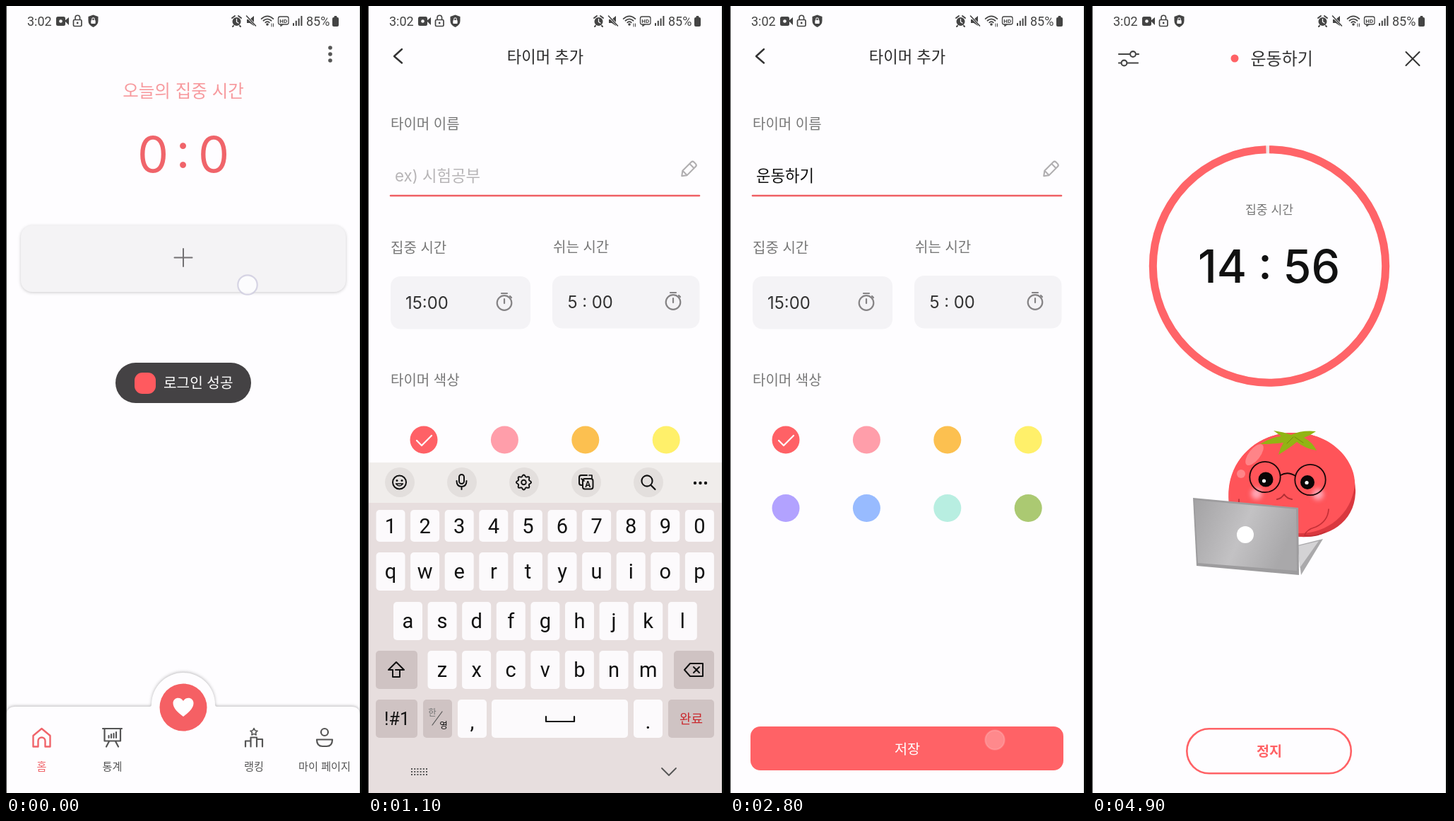
Animation of 504 by 1112 pixels, one loop 5000 ms. Source, as an HTML page:

```html
<!DOCTYPE html>
<html lang="ko">
<head>
<meta charset="utf-8">
<title>Focus timer</title>
<style>
html, body { margin: 0; width: 100%; height: 100%; overflow: hidden; background: #fefdff; }
svg { display: block; width: 504px; height: 1112px; }
text { font-family: 'Noto Sans CJK KR', 'Noto Sans KR', sans-serif; white-space: pre; }
.n { font-family: Inter, 'Noto Sans CJK KR', sans-serif; }
.r { font-family: Roboto, 'Noto Sans CJK KR', sans-serif; }
.m { text-anchor: middle; }
.e { text-anchor: end; }
.soft { filter: drop-shadow(0 1px 2px #0003); }
.up { filter: drop-shadow(0 -1px 2px #0004); }
.blur { filter: blur(3px); }
</style>
</head>
<body>
<svg id="stage" viewBox="0 0 504 1112"></svg>
<script>
const RED = '#ff6266', INK = '#444', GREY = '#777', BG = '#fefdff';
const LOOP = 5000, STEP = 100;

const rect = (x, y, w, h, r, fill, more = '') =>
  `<rect x="${x}" y="${y}" width="${w}" height="${h}" rx="${r}" fill="${fill}" ${more}/>`;
const dot = (x, y, r, fill, more = '') =>
  `<circle cx="${x}" cy="${y}" r="${r}" fill="${fill}" ${more}/>`;
const ring = (x, y, r, color, w) => dot(x, y, r, 'none', `stroke="${color}" stroke-width="${w}"`);
const line = (d, color, w, fill = 'none', more = '') =>
  `<path d="${d}" stroke="${color}" stroke-width="${w}" fill="${fill}" stroke-linecap="round" stroke-linejoin="round" ${more}/>`;
const fill = (d, color, more = '') => `<path d="${d}" fill="${color}" ${more}/>`;
const text = (x, y, size, str, color, cls = '', more = '') =>
  `<text x="${x}" y="${y}" font-size="${size}" fill="${color}" class="${cls}" ${more}>${str}</text>`;
const group = (id, body, more = '') => `<g id="${id}" ${more}>${body}</g>`;
const medium = 'font-weight="500"', bold = 'font-weight="700"';

function statusBar() {
  const bars = [0, 1, 2, 3].map(i => rect(406 + i * 3.8, 24 - i * 3.3, 2, 4 + i * 3.3, 0.5, INK)).join('');
  const waves = [3.5, 7, 10.5].map(r =>
    line(`M${370 - r * .8} ${26 - r * .75}Q370 ${26 - r * 1.45} ${370 + r * .8} ${26 - r * .75}`, INK, 1.7)).join('');
  return text(30, 27.5, 18, '3:02', INK, 'r')
    + rect(71, 15, 13, 13, 2.5, INK) + fill('M83 21l6-5v11z', INK) + dot(77.5, 21.5, 2.3, BG)
    + rect(95.5, 19.5, 11.5, 9, 1.5, 'none', `stroke="${INK}" stroke-width="1.7"`)
    + line('M98 19v-2.500a3.300 3.300 0 0 1 6.600 0v2.500', INK, 1.6) + dot(101.2, 24, 1.4, INK)
    + fill('M123.500 12.500l7 2.500v6q0 6-7 9q-7-3-7-9v-6z', INK)
    + rect(120.3, 20, 6.4, 5, 1, BG) + line('M121.800 20v-1.500a1.700 1.700 0 0 1 3.400 0v1.500', BG, 1.1)
    + dot(326.5, 22, 6, INK) + line('M320 17l4-3M333 17l-4-3M322 28l-1 1M331 28l1 1', INK, 2)
    + line('M326.500 18.500v4l2.500 1.500', BG, 1.3)
    + fill('M341 19h4l6-5v14l-6-4h-4z', INK) + line('M340 14l14 14', BG, 3) + line('M340.500 14l13 14', INK, 1.6)
    + waves + dot(370, 26, 1.8, INK) + line('M376 25v4m2.500-4v4', INK, 1)
    + rect(385.500, 15, 14.500, 11, 2.5, 'none', `stroke="${INK}" stroke-width="1.3"`)
    + text(392.8, 23.5, 8, 'HD', INK, 'r m', bold) + line('M389 26v2.500l3-2.500', INK, 1.2)
    + bars + text(425, 27.5, 18, '85%', INK, 'r')
    + rect(462, 16, 9, 13, 2, INK) + rect(464.5, 14, 4, 3, 1, INK);
}

function homePage() {
  const plus = rect(21, 310, 460, 94, 16, '#f4f3f5', 'class="soft"')
    + line('M238.500 355.500h25M251 343v25', '#737173', 2);
  const card = rect(21, 310, 460, 94, 16, '#fff', 'class="soft"') + dot(54, 357, 8, RED)
    + text(78, 365, 22, '운동하기', '#333') + text(450, 365, 22, '15 : 00', GREY, 'n e');
  const nav = fill('M1 1112V1002Q1 990 13 990H203Q206 990 206 987A45 45 0 0 1 296 987Q296 990 299 990H489Q501 990 501 1002V1112z', BG, 'class="up"')
    + dot(251, 991, 33.5, '#f56064')
    + fill('M251 1004C243 998 236.500 992 236.500 985C236.500 977 247 975 251 982C255 975 265.500 977 265.500 985C265.500 992 259 998 251 1004z', '#fff');
  const home = line('M38.500 1031l12-10l12 10v15.500h-7v-8a5 5 0 0 0-10 0v8h-7z', '#f0646a', 2.4);
  const stats = line('M137 1021h27M139.500 1021v17.500h22.500v-17.500M146 1039l-4 7.500M155 1039l4 7.500', '#555', 2.2)
    + line('M145.500 1034v-3M149 1034v-5M152.500 1034v-6M156 1034v-8', '#555', 2.1);
  const rank = line('M339 1046.500v-8h7.500M346.500 1046.500v-13h8.500v13M355 1036h8v10.500', '#555', 2.2)
    + line('M351 1020.500l1.600 3.200 3.400.500-2.500 2.400.600 3.400-3.100-1.600-3.100 1.600.600-3.400-2.500-2.400 3.400-.500z', '#555', 1.6);
  const me = ring(451, 1026, 5, '#555', 2.2) + line('M440 1036.500h22q0 9.500-8 9.500h-6q-8 0-8-9.500z', '#555', 2.2);
  const labels = [[50.500, '홈', '#f0646a'], [150.500, '통계', '#555'], [351, '랭킹', '#555'], [451, '마이 페이지', '#555']]
    .map(([x, s, c]) => text(x, 1080, 15.2, s, c, 'm', medium)).join('');
  return rect(1, 0, 500, 1112, 0, BG)
    + [59, 68, 77].map(y => dot(459, y, 2.8, '#555')).join('')
    + text(251, 129, 24.5, '오늘의 집중 시간', '#f79a9e', 'm')
    + text(208, 235, 70, '0', '#f0646a', 'n m') + text(294, 235, 70, '0', '#f0646a', 'n m')
    + text(250.500, 229, 68, ':', '#f0646a', 'n m')
    + group('card', card) + group('plus', plus) + nav + home + stats + rank + me + labels;
}

function stopwatch(x, y) {
  return ring(x, y + 1.5, 10.3, '#858385', 2.2)
    + line(`M${x - 4} ${y - 12}h8M${x} ${y - 4}v6M${x + 8} ${y - 8}l2 2`, '#858385', 2.2);
}

function addPage() {
  const colors = ['#ff6166', '#ff9eaa', '#fcc050', '#fff06a', '#b2a2ff', '#98bbff', '#b8eee1', '#abc972'];
  const dots = colors.map((c, i) => dot(79 + (i % 4) * 114.4, i < 4 ? 613 : 709.5, 19.5, c)).join('');
  const pencil = line('M-13 0l6-4.500h17a3 3 0 0 1 3 3v3a3 3 0 0 1-3 3h-17zM-7-4.500v9M7-4.500v9', '#b0aeb0', 2.1, 'none',
    'transform="translate(453.500 231) rotate(-45)"');
  return rect(1, 0, 500, 1112, 0, BG)
    + line('M48 61l-11 10l11 9.500', '#333', 2.4)
    + text(251, 79.5, 22.2, '타이머 추가', '#2a2a2a', 'm')
    + text(32, 174, 20, '타이머 이름', GREY)
    + text(38, 248, 22.3, 'ex) 시험공부', '#b7b5b7', 'n', 'id="hint"')
    + text(37, 248, 22.3, '', '#111', '', 'id="name"')
    + pencil + line('M32 268.500H469', '#8a888a', 1.2)
    + line('', '#ef5f64', 2.6, 'none', 'id="focus"')
    + line('', '#111', 1.5, 'none', 'id="compose"')
    + line('', '#e0565c', 2.4, 'none', 'id="caret"')
    + text(32, 349, 20, '집중 시간', GREY) + text(262, 348, 20, '쉬는 시간', GREY)
    + rect(32, 382, 198, 74.5, 14, '#f4f3f6') + rect(261, 381, 208.5, 74.5, 14, '#f4f3f6')
    + text(53, 428, 23.8, '15:00', '#333', 'n') + text(282.5, 427, 23.8, '5 : 00', '#333', 'n')
    + stopwatch(193, 418) + stopwatch(432, 417)
    + text(32, 536, 20, '타이머 색상', GREY) + dots
    + line('M69 614l7 7l14-14', '#fff', 2.2)
    + rect(29, 1018, 443, 62, 14, RED) + text(251, 1057, 19.7, '저장', '#fff', 'm', medium);
}

const ROWS = [
  { y: 712, h: 45, x: 32, en: '1234567890', ko: '1234567890' },
  { y: 772, h: 54, x: 32, en: 'qwertyuiop', ko: 'ㅂㅈㄷㄱㅅㅛㅕㅑㅐㅔ' },
  { y: 842, h: 54, x: 56.5, en: 'asdfghjkl', ko: 'ㅁㄴㅇㄹㅎㅗㅓㅏㅣ' },
  { y: 911, h: 54, x: 105, en: 'zxcvbnm', ko: 'ㅋㅌㅊㅍㅠㅜㅡ' }
];
const PITCH = 48.6, KEY = '#fcfafc', DARK = '#cfc3c3';

function letters(lang) {
  const size = lang === 'ko' ? 25 : 29;
  return ROWS.map(r => [...r[lang]].map((c, i) =>
    text(r.x + i * PITCH, r.y + r.h / 2 + 10, c < 'ㄱ' ? 29 : size, c, '#111', 'r m')).join('')).join('')
    + text(91, 1003, 12.5, '한', lang === 'ko' ? '#111' : '#777', 'm')
    + text(107, 1021, 12.5, '영', lang === 'ko' ? '#777' : '#111', 'm');
}

function keyboard() {
  const gear = Array.from({ length: 48 }, (_, i) => {
    const a = i * Math.PI / 24, r = 9.3 + 1.3 * Math.cos(a * 8);
    return `${i ? 'L' : 'M'}${(220.5 + r * Math.cos(a)).toFixed(1)} ${(673 + r * Math.sin(a)).toFixed(1)}`;
  }).join('') + 'z';
  const keys = ROWS.map(r => [...r.en].map((_, i) =>
    rect(r.x + i * PITCH - 20.5, r.y, 41, r.h, 5, KEY)).join('')).join('');
  const specials = [[11, 911, 59, DARK], [433, 911, 57, DARK], [11, 980, 59, DARK], [78, 980, 41, DARK],
    [127, 980, 41, KEY], [175, 980, 193, KEY], [376, 980, 41, KEY], [425, 980, 65, DARK]]
    .map(([x, y, w, c]) => rect(x, y, w, 54, 5, c)).join('');
  const grid = Array.from({ length: 18 }, (_, i) =>
    rect(61 + (i % 6) * 4.2, 1077 + Math.floor(i / 6) * 4, 2, 2, 0, '#555')).join('');
  return rect(1, 645, 500, 467, 0, '#e7dede') + rect(1, 645, 500, 57, 0, '#f0edeb')
    + [45, 133, 221, 309, 397].map(x => dot(x, 673, 21, '#e3dfdd')).join('')
    + ring(44.5, 673, 9.5, '#111', 2) + dot(41, 670.5, 1.5, '#111') + dot(48, 670.5, 1.5, '#111')
    + line('M39.500 675q5 6 10 0z', '#111', 1.5)
    + rect(129, 662, 7, 13, 3.5, 'none', 'stroke="#111" stroke-width="2"')
    + line('M125.500 671q0 8 7 8t7-8M132.500 679v4', '#111', 2)
    + line(gear, '#111', 1.9) + ring(220.5, 673, 3.3, '#111', 1.9)
    + line('M303 677h-1a3 3 0 0 1-3-3v-8a3 3 0 0 1 3-3h8', '#111', 2)
    + rect(304, 668, 14.5, 14.5, 3, '#e3dfdd', 'stroke="#111" stroke-width="2"')
    + text(311.3, 680, 12, 'A', '#111', 'r m', bold) + line('M313 663h4v4M302 668l4 3', '#111', 1.7)
    + ring(395, 671, 7.6, '#111', 2.1) + line('M400.500 677l6 6', '#111', 2.2)
    + [463, 470.5, 478].map(x => dot(x, 674, 2.2, '#111')).join('')
    + keys + specials
    + line('M40 927l-11 11h6v10h10v-10h-6h12z', '#111', 2)
    + line('M448 938l8-9h18v18h-18zM461 934l8 8M469 934l-8 8', '#111', 2)
    + text(41, 1016, 25, '!#1', '#111', 'r m') + line('M91 1016l14-19', '#555', 1.2)
    + text(147.5, 1021, 30, ',', '#111', 'r m') + text(396.5, 1021, 30, '.', '#111', 'r m')
    + line('M252 1004v7h40v-7', '#111', 2.2) + text(457.5, 1014, 18, '완료', '#c9282d', 'm')
    + group('en', letters('en')) + group('ko', letters('ko'))
    + grid + line('M416 1077l10 10l10-10', '#555', 1.8)
    + group('popup', rect(-37.5, -106, 75, 96, 9, '#fdfcfd', 'class="soft"')
      + text(0, -41, 42, '', '#111', 'm', 'id="glyph"'));
}

function tomato() {
  const body = 'M194 705C188 645 232 602 287 603C345 604 375 650 373 688C371 733 330 752 294 750L215 745Q197 735 194 705z';
  return fill(body, '#d9383f')
    + fill('M194 700C188 645 232 602 287 603C345 604 374 648 372 676C368 720 330 746 294 745L215 745Q197 735 194 700z', '#ff5459')
    + '<ellipse cx="230" cy="634" rx="8" ry="18" fill="#ff8488" transform="rotate(38 230 634)"/>'
    + dot(211, 661, 6, '#ff8488')
    + fill('M257 600Q272 602 282 606Q297 599 317 601Q309 607 300 610Q312 616 318 628Q301 625 290 616Q282 623 264 634Q266 625 271 617Q254 619 238 619Q254 609 268 608z', '#92b414')
    + line('M285 609l-9 9M287 609l12 8', '#718f0d', 1)
    + '<g class="blur">' + dot(233, 689, 8, '#ffa5b4') + dot(320, 690, 8, '#ffa5b4') + '</g>'
    + dot(246, 669, 10.5, '#0b0506') + dot(305, 673, 10, '#0b0506')
    + dot(243.5, 671, 2.6, '#fff') + dot(304, 673.5, 2.6, '#fff')
    + ring(245, 665.5, 21.7, '#180708', 1.8) + ring(309, 669.5, 21.7, '#180708', 1.8)
    + line('M267 663q10-6 21 1', '#180708', 1.8)
    + line('M262 697q6-1 10-7q4 6 11 7', '#b02e34', 2)
    + line('M335 711q-1 17-18 25q-14 4-16 12q14 3 29-5', '#c32f36', 1.7)
    + line('M208 697v5', '#b02e34', 1.6)
    + fill('M291 762L327 753L296 804z', '#aaa9ab') + fill('M292 763L321 756L294 794z', '#d4d3d5')
    + fill('M143 695L292 709L293 804L148 791z', '#9d9c9e')
    + fill('M145 698L289 711L290 798L150 787z', 'url(#metal)')
    + dot(217, 747, 12, '#fff');
}

function timerPage() {
  return rect(1, -30, 500, 1150, 0, BG)
    + line('M38 68h15M63 68h3M38 80.500h3M50 80.500h15', INK, 2.2)
    + ring(58, 68, 3.9, INK, 2.1) + ring(45.5, 80.5, 3.9, INK, 2.1)
    + dot(202, 74, 5.5, RED) + text(224.5, 83, 24, '운동하기', '#333')
    + line('M444.500 65l19 19M463.500 65l-19 19', '#333', 2)
    + ring(251, 367.5, 164.7, '#f1e6e7', 11)
    + dot(251, 367.5, 164.7, 'none', 'id="arc" pathLength="900" stroke="#ff6468" stroke-width="11" transform="rotate(-90 251 367.500)"')
    + text(251, 294, 17.2, '집중 시간', GREY, 'm')
    + text(219, 390.5, 64.5, '15', '#111', 'n e', medium + ' id="min"')
    + text(245, 386, 64.5, ':', '#111', 'n m', medium)
    + text(271.5, 390.5, 64.5, '00', '#111', 'n', medium + ' id="sec"')
    + tomato()
    + rect(134.3, 1021.3, 232.5, 63, 31.5, RED, `id="btn" stroke="${RED}" stroke-width="2.6"`)
    + text(251, 1060, 19.7, '시작', '#fff', 'm', bold + ' id="act"');
}

const toast = rect(155, 504, 192, 57, 28.5, '#444244') + rect(182, 518, 30, 30, 11, '#ff5a5f')
  + text(223, 540, 20.2, '로그인 성공', '#fff');

document.getElementById('stage').innerHTML =
  '<defs><linearGradient id="metal" x2="1" y2=".3"><stop stop-color="#a3a2a4"/><stop offset=".55" stop-color="#c3c2c4"/><stop offset="1" stop-color="#a9a8aa"/></linearGradient></defs>'
  + rect(0, 0, 504, 1112, 0, BG)
  + group('home', homePage()) + group('add', addPage()) + group('kb', keyboard()) + group('timer', timerPage())
  + group('bar', statusBar()) + group('toast', toast) + group('taps', '')
  + rect(0, 0, 504, 26.5, 0, '#000', 'id="band"')
  + rect(0, 0, 1, 1112, 0, '#444') + rect(501, 0, 3, 1112, 0, '#050805');

const $ = id => document.getElementById(id);
const show = (id, on) => { $(id).style.display = on ? '' : 'none'; };
const move = (id, x, y) => $(id).setAttribute('transform', `translate(${x} ${y})`);
const latest = (table, t) => table.filter(row => row[0] <= t).pop();

// time, typed text, pressed jamo
const TYPING = [[0, ''], [1400, 'ㅇ', 'ㅇ'], [1500, '우', 'ㅜ'], [1600, '운', 'ㄴ'], [1700, '운'], [1800, '운ㄷ', 'ㄷ'],
  [1900, '운도', 'ㅗ'], [2000, '운동', 'ㅇ'], [2100, '운동ㅎ', 'ㅎ'], [2200, '운동하', 'ㅏ'],
  [2300, '운동학', 'ㄱ'], [2400, '운동하기', 'ㅣ'], [2500, '운동하기']];
// start, end, x, y
const TAPS = [[0, 500, 342, 394], [800, 900, 297, 251], [1200, 1200, 98, 1010], [1400, 1400, 160, 875],
  [1500, 1500, 350, 945], [1600, 1600, 110, 876], [1800, 1800, 135, 822], [1900, 1900, 305, 860],
  [1900, 2000, 171, 877], [2100, 2100, 255, 872], [2200, 2200, 400, 872], [2300, 2300, 185, 808],
  [2400, 2400, 448, 875], [2500, 2500, 457, 1012], [2800, 2800, 375, 1037], [3300, 3400, 320, 362],
  [4100, 4100, 262, 1056]];
const KEYBOARD = [[0, 467], [1000, 190], [1100, 0], [2600, 240], [2700, 467]];
const FOCUS = [[0, 0], [800, 80], [900, 192], [1000, 218.5]];
const LEFT = [[0, 900], [4300, 899], [4500, 898], [4700, 897], [4900, 896]];

function popupAt(jamo) {
  show('popup', jamo);
  const row = ROWS.find(r => jamo && r.ko.includes(jamo));
  if (!row) return;
  move('popup', row.x + row.ko.indexOf(jamo) * PITCH, row.y);
  $('glyph').textContent = jamo;
}

function draw(t) {
  const inAdd = t >= 600 && t < 3000, inTimer = t >= 3500;
  const shifted = t === 600 || t === 700 || (t >= 3600 && t < 3900);
  show('add', inAdd);
  show('timer', inTimer);
  show('band', shifted);
  $('timer').style.opacity = t === 3500 ? 0.5 : 1;
  move('add', 0, shifted ? 27 : 0);
  move('timer', 0, shifted ? 27 : 0);

  show('card', t >= 3000);
  move('plus', 0, t >= 3000 ? 114 : 0);
  show('toast', t < 900);
  $('toast').style.opacity = t === 800 ? 0.4 : 1;

  const kbY = latest(KEYBOARD, t)[1];
  show('kb', inAdd && kbY < 467);
  move('kb', 0, kbY);
  show('en', t < 1300);
  show('ko', t >= 1300);

  const [, typed, jamo] = latest(TYPING, t), n = typed.length, w = 20.5;
  $('name').textContent = typed;
  show('hint', !n);
  popupAt(jamo);
  $('compose').setAttribute('d', `M${37 + w * (n - 1)} 253h${w}`);
  show('compose', n && t < 2500);
  $('caret').setAttribute('d', `M${n ? 39 + w * n : 38.5} 224v32`);
  show('caret', t >= 800 && t < 2600 && t !== 1100);
  const half = latest(FOCUS, t)[1];
  $('focus').setAttribute('d', `M${250.5 - half} 268h${half * 2}`);
  show('focus', half);

  const left = latest(LEFT, t)[1], pad = v => String(v).padStart(2, '0');
  $('min').textContent = pad(Math.floor(left / 60));
  $('sec').textContent = pad(left % 60);
  $('arc').setAttribute('stroke-dasharray', left === 900 ? 'none' : `${left} 900`);
  const running = t >= 4200;
  $('btn').setAttribute('fill', running ? BG : RED);
  $('act').setAttribute('fill', running ? RED : '#fff');
  $('act').textContent = running ? '정지' : '시작';

  $('taps').innerHTML = TAPS.filter(([a, b]) => t >= a && t < b + 200).map(([, b, x, y]) => {
    const onRed = y > 1030;
    return dot(x, y, 13.7, '#fff', `fill-opacity="${onRed ? 0.25 : 0.75}" stroke="${onRed ? '#fff' : '#c9c7dc'}"
      stroke-opacity="${onRed ? 0.15 : 0.75}" stroke-width="2.200" opacity="${t > b ? 0.6 : 1}"`);
  }).join('');
}

const start = performance.now();
let last = -1;
function tick() {
  const t = Math.floor(((performance.now() - start) % LOOP) / STEP) * STEP;
  if (t !== last) draw(last = t);
  requestAnimationFrame(tick);
}
tick();
</script>
</body>
</html>
```
